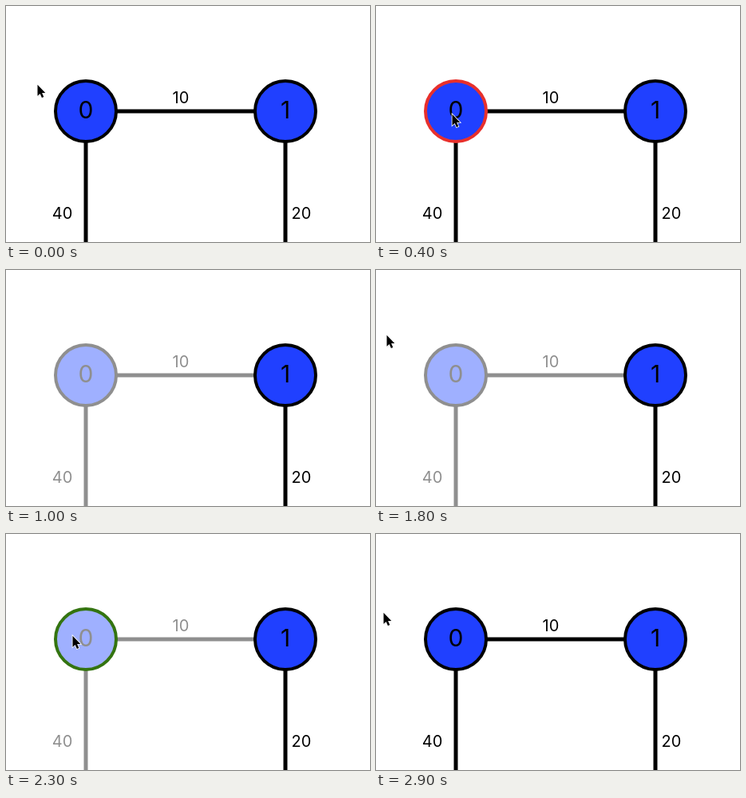
Animation of 456x296 px, one loop 3 s. Source, as an HTML page:

```html
<!DOCTYPE html>
<html lang="en">
<head>
<meta charset="utf-8">
<title>Graph node toggle</title>
<style>
  html, body { margin: 0; width: 100%; height: 100%; overflow: hidden; background: #fff; }
  svg { display: block; }
  text { font-family: Inter, "Liberation Sans", sans-serif; font-size: 20px; text-anchor: middle; }
  .name { font-size: 30px; }
  .edge { stroke: var(--ink); stroke-width: 5; }
  .node { fill: var(--fill); stroke: var(--ink); stroke-width: 4; }
  text { fill: var(--ink); }
  g { --ink: #000; --fill: #2040ff; }
  g.dim { --ink: #8f8f8f; --fill: #9fb0ff; }
</style>
</head>
<body>
<svg width="456" height="296" viewBox="0 0 456 296">
  <g id="first">
    <path class="edge" d="M138 132H312M100 170V300" fill="none"/>
    <text x="219" y="122">10</text>
    <text x="70.5" y="267">40</text>
    <circle id="ring" class="node" cx="100" cy="132" r="38"/>
    <text class="name" x="100" y="141">0</text>
  </g>
  <g>
    <path class="edge" d="M350 170V300"/>
    <text x="370" y="267">20</text>
    <circle class="node" cx="350" cy="132" r="38"/>
    <text class="name" x="350" y="141">1</text>
  </g>
  <g id="cursor">
    <path d="M1 2V16L4 13.2L6.2 18L8.6 17L6.4 12.2H10.5Z" fill="#000" opacity=".16"/>
    <path d="M.5 .8V14.8L3.7 11.9L5.9 17L8.3 16L6.1 11H10.3Z" stroke="#fff" stroke-width="1.6" paint-order="stroke"/>
  </g>
</svg>
<script>
const LOOP = 3000, STEP = 100;
const first = document.getElementById('first');
const ring = document.getElementById('ring');
const cursor = document.getElementById('cursor');

const easeOut = u => 1 - (1 - u) ** 2;
const easeIn = u => u ** 1.5;
const smooth = u => u * u * (3 - 2 * u);

// Cursor trips: start time, end time, from, to, easing
const trips = [
  [0, 400, [39, 98], [95, 135], easeOut],
  [600, 900, [95, 135], [309, 284], easeIn],
  [1800, 2300, [13, 81], [83, 127], smooth],
  [2500, 2900, [83, 127], [9, 98], smooth]
];

function cursorAt(t) {
  if (t >= 1000 && t < 1800) return null;
  const [start, end, from, to, ease] = trips.filter(trip => trip[0] <= t).pop();
  const k = ease(Math.min(1, (t - start) / (end - start)));
  return from.map((v, i) => v + (to[i] - v) * k);
}

function draw(ms) {
  const t = Math.floor((ms % LOOP) / STEP) * STEP;
  const pos = cursorAt(t);
  const hover = pos && Math.hypot(pos[0] - 100, pos[1] - 132) < 40;
  first.classList.toggle('dim', t >= 600 && t < 2500);
  ring.style.stroke = hover ? (t < 1000 ? '#e8302c' : '#347410') : '';
  cursor.style.display = pos ? '' : 'none';
  if (pos) cursor.setAttribute('transform', `translate(${pos})`);
}

const begin = performance.now();
function tick() {
  draw(performance.now() - begin);
  requestAnimationFrame(tick);
}
tick();
</script>
</body>
</html>
```
